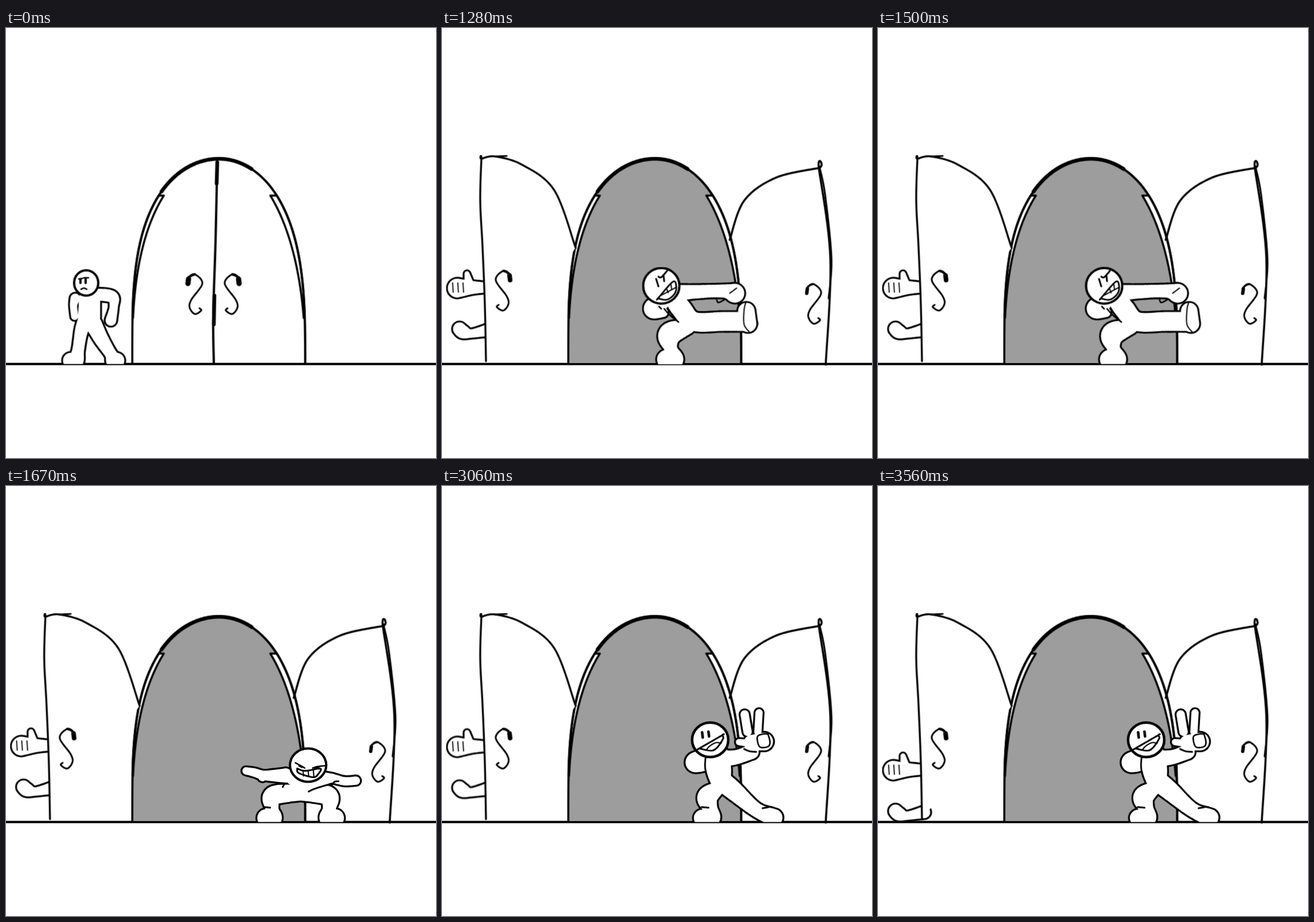
Animation of 748 by 748 pixels, one loop 3.62 s. Source, as an HTML page:

```html
<!DOCTYPE html>
<html lang="en">
<head>
<meta charset="utf-8">
<title>Door kick</title>
<style>
html, body { margin: 0; width: 100%; height: 100%; overflow: hidden; background: #fff; }
svg { display: block; width: 100vw; height: 100vh; }
path { stroke-linecap: round; stroke-linejoin: round; }
.pose { transform-origin: 511px 584px; }
</style>
</head>
<body>
<svg id="stage" viewBox="0 0 748 748">
  <clipPath id="above"><rect x="-200" y="-200" width="1200" height="784"/></clipPath>
</svg>
<script>
const LOOP = 3620, INK = '#000', RED = '#fb0446', GREY = '#9d9d9d', GROUND = 584;
const stage = document.getElementById('stage');

function node(tag, attrs, parent) {
  const el = document.createElementNS('http://www.w3.org/2000/svg', tag);
  for (const k in attrs) el.setAttribute(k, attrs[k]);
  return parent.appendChild(el);
}
const root = node('g', { transform: 'translate(.5 .5)' }, stage);
const group = (attrs = {}, parent = root) => node('g', attrs, parent);
const lerp = (a, b, u) => a.map((v, k) => v + (b[k] - v) * u);
const parse = text => text.split(' ').map(s => s.split(',').map(Number));

let seed = 7;
const rand = () => (seed = seed * 16807 % 2147483647) / 2147483647;
const jitter = size => (rand() - 0.5) * 2 * size;

// Samples a Catmull-Rom curve in any dimension; a doubled point makes a corner.
function spline(p, n = 12) {
  const at = i => p[Math.max(0, Math.min(p.length - 1, i))];
  const out = [p[0]];
  for (let i = 0; i < p.length - 1; i++)
    for (let s = 1; s <= n; s++) {
      const u = s / n, [a, b, c, d] = [-1, 0, 1, 2].map(k => at(i + k));
      out.push(b.map((v, k) => v + u / 2 * (c[k] - a[k] +
        u * (2 * a[k] - 5 * v + 4 * c[k] - d[k] + u * (3 * (v - c[k]) + d[k] - a[k])))));
    }
  return out;
}
function trace(parent, width, pts, fill = 'none', stroke = INK) {
  return node('path', { d: 'M' + pts.join('L'), fill, stroke, 'stroke-width': width }, parent);
}
const draw = (parent, width, text, fill, stroke) => trace(parent, width, spline(parse(text)), fill, stroke);
const lines = (parent, width, list, stroke) => list.forEach(s => draw(parent, width, s, 'none', stroke));
const oval = (parent, cx, cy, rx, ry, width) =>
  node('ellipse', { cx, cy, rx, ry, fill: '#fff', stroke: INK, 'stroke-width': width }, parent);

// Merges limbs, each a chain of x,y,radius, into one outlined body.
function body(parent, limbs) {
  const g = group({}, parent);
  for (const [grow, fill] of [[1.6, INK], [-1.6, '#fff']])
    for (const limb of limbs) {
      const d = spline(parse(limb)).map(([x, y, size]) => {
        const r = size + grow;
        return `M${x - r},${y}a${r},${r} 0 1 0 ${2 * r},0a${r},${r} 0 1 0 ${-2 * r},0`;
      });
      node('path', { d: d.join(''), fill }, g);
    }
}

const [ground, arch, closed, open, burst, kick, crouch, wave] =
  ['', '', '', '', '', 'pose', 'pose', 'pose'].map(name => group({ class: name }));
const grounded = parent => group({ 'clip-path': 'url(#above)' }, parent);

draw(ground, 4, `-5,${GROUND} 753,${GROUND}`);

// Doorway: each half is a superellipse; a lower power gives the inner rim.
function rim(half, power, from = 0, to = 1) {
  return Array.from({ length: 61 }, (_, i) => {
    const v = from + (to - from) * Math.sin(i / 60 * Math.PI / 2);
    return [370 + half * Math.sqrt(Math.max(0, 1 - v ** power)), 582 - 355 * v];
  });
}
const leftRim = rim(-151, 3.3), rightRim = rim(150, 3).reverse();
const dark = trace(arch, 0, [...leftRim, ...rightRim], GREY, 'none');
for (const [half, outer, inner] of [[-151, 3.3, 2.6], [150, 3, 2.2]])
  trace(arch, 3.5, [...rim(half, outer, 0.22, 0.82), ...rim(half, inner, 0.22, 0.82).reverse()], '#fff');
trace(arch, 4, [...leftRim, ...rightRim]);
trace(arch, 6.5, [...rim(-151, 3.3, 0.84), ...rim(150, 3, 0.95).reverse()]);

// Curled door handle
function handle(parent, x, y, flip, head) {
  const g = group({ transform: `translate(${x} ${y}) scale(${flip} 1)` }, parent);
  draw(g, 3, '12,-17 11,-28 0,-34 -13,-18 6,10 9,24 0,35 -11,29 -8,25');
  draw(g, head, '12,-18 11,-26');
  draw(g, head / 2, '11,-28 6,-32 0,-34');
}

// Closed doors and waiting figure
draw(closed, 4, '367,231 364,370 360,500 361,582');
lines(closed, 6.5, ['367,233 366,270', '362,465 361,515']);
handle(closed, 328, 462, -1, 9);
handle(closed, 393, 462, 1, 9);

function idle(parent) {
  body(grounded(parent), [
    '120,470,10 117,482,8 119,501,8',
    '156,463,12 184,467,12 187,484,9 182,508,11',
    '145,470,20 144,502,21',
    '140,508,17 131,525,13 125,560,12 121,578,15 112,578,15',
    '152,515,16 165,540,14 182,567,12 188,578,16 192,578,15']);
  oval(parent, 139, 443, 21, 22, 4);
  lines(parent, 2.5, ['126,436 133,435', '135,434 143,434', '130,454 135,452 140,454']);
  lines(parent, 4, ['129,437 129,443', '138,435 138,443']);
}
idle(closed);

// Open doors, with a flattened figure behind the left one
const limbs = group({}, grounded(open));
body(limbs, ['80,451,10 52,451,13 26,452,18', '46,442,9 43,427,6']);
body(limbs, ['80,525,12 50,531,9 36,528,13 30,523,13']);
for (let x = 18; x < 40; x += 9) draw(limbs, 1.8, `${x},443 ${x + 1},459`);
draw(open, 3.3, '76,579 74,480 70,380 66,300 68,227 68,227 92,223 140,238 195,282 232,382', '#fff');
draw(open, 3.5, '500,368 525,300 580,260 655,243 655,243 675,400 667,585');
lines(open, 3, ['656,240 666,290 677,400 672,470', '92,223 112,222']);
handle(open, 106, 456, 1, 8);
handle(open, 646, 479, -1, 6);

// Doors mid-swing
idle(burst);
draw(burst, 3, '138,582 127,440 150,227 150,227 230,237 335,233 335,233 303,350 279,583', '#fff');
draw(burst, 3.5, '279,583 284,490 303,350 345,234 345,234 393,234 393,234 432,390 440,578', GREY);
lines(burst, 3, [
  '153,226 136,350 133,500', '408,235 480,238 578,228 578,228 608,320 628,470 618,580',
  '414,275 434,400 445,548']);
lines(burst, 5, ['138,582 180,584 280,583', '440,578 500,582 618,580', '335,234 383,226 412,237']);
lines(burst, 1.7, ['586,232 600,270 607,315', '578,260 598,400 597,468']);

// Scratchy shading: leaning columns crossed by looping rows.
function hatch(x, y, width, height, lean, cols, rows) {
  for (let i = 0; i < cols; i++) {
    const cx = x + width * (i + 0.4) / cols;
    trace(burst, 1.7, spline([[cx, y + 15 + jitter(15)], [cx + lean, y + height / 2], [cx + lean, y + height - 20 + jitter(20)]]));
  }
  for (let i = 0; i < rows; i++) {
    const cy = y + height * i / (rows - 1), end = x + width + jitter(20);
    const row = [[x + jitter(15), cy], [x + width / 2, cy + jitter(6)], [end, cy + jitter(8)],
      [x + width * 0.4, cy + 8 + jitter(5)], [end - 15, cy + 14 + jitter(8)]];
    trace(burst, 2.3, spline(row.slice(0, 3 + i % 3)));
  }
}
hatch(168, 268, 115, 262, -20, 5, 11);
hatch(490, 266, 95, 282, 14, 4, 9);
draw(burst, 2.4, '465,266 493,420 483,530');

// Red impact scribbles; a zigzag sweeps one spike towards another.
function zigzag(first, last, count) {
  const [a, b] = [first, last].map(parse), pts = [];
  for (let k = 0; k < count; k++)
    for (const end of [0, 1]) {
      const p = lerp(a[end], b[end], k / (count - 1));
      pts.push(p, p.map(v => v + 1));
    }
  trace(burst, 2.8, spline(pts), 'none', RED);
}
zigzag('58,16 22,222', '174,84 105,303', 3);
zigzag('222,180 152,340', '296,325 242,420', 5);
zigzag('413,280 473,327', '352,306 407,349', 3);
zigzag('400,438 393,492', '455,440 445,505', 3);
lines(burst, 2.6, [
  '0,105 30,65 58,16', '105,303 130,295 170,260 222,180',
  '338,0 318,28 270,52 275,70 352,132 341,136',
  '716,0 748,66 630,88 601,150 585,175 468,208 521,285 515,300 413,280',
  '748,402 720,395 595,332 600,382 600,382 515,352 487,362 500,390',
  '445,505 480,460 505,460 534,570 534,570 580,505 660,505 748,590',
  '0,631 120,675 110,625 57,560 95,575 88,552 170,500 215,490',
  '145,500 200,480 335,508 240,430 360,468 280,433',
  '338,505 348,542 305,555 358,615 275,620 290,685 340,748',
  '358,615 390,675 218,654 300,715 200,712 140,728 188,700',
  '300,715 170,723 182,748'], RED);
lines(burst, 1.7, [
  '72,334 130,333 180,310 215,230', '128,0 180,42 266,104 255,71',
  '460,48 470,140 446,201', '516,26 500,65 484,152',
  '625,266 705,265 686,232', '637,243 683,294', '678,498 550,437 535,457',
  '583,597 650,612 748,653', '466,686 465,662 470,660',
  '4,390 132,408 10,392', '10,399 100,418 195,430',
  '0,597 70,610 205,640 202,610', '215,490 115,470 195,520 148,495'], RED);

// Kicking figure
body(grounded(kick), [
  '392,478,15 379,488,18 396,494,10',
  '410,462,18 440,459,14 500,457,13 521,461,18',
  '415,470,18 428,488,19 450,510,18 500,510,18 538,510,18',
  '541,492,16 544,514,16',
  '440,520,13 408,532,21 409,556,13 415,576,18 402,576,18']);
lines(kick, 2.6, ['398,488 408,499 423,511', '389,484 393,488', '489,469 492,477 503,472']);
lines(kick, 2, ['540,477 537,490 537,515 546,528', '512,461 524,452']);
oval(kick, 393, 448, 31.5, 31, 4);
draw(kick, 2.8, '387,470 387,470 413,441 419,449 416,462 403,472 387,470', '#fff');
lines(kick, 2, ['392,465 405,458 418,451', '402,452 405,460', '410,446 411,455']);
lines(kick, 3, ['384,436 388,449', '388,432 393,433 403,422', '397,431 398,440']);

// Crouching figure, legs mirrored
const leg = parse('512,533,15 465,538,18 462,560,13 464,577,17 452,577,17');
body(grounded(crouch), [
  leg.join(' '), leg.map(([x, y, r]) => [1024 - x, y, r]).join(' '),
  '486,503,14 450,503,10 432,498,9 417,495,8', '444,507,7 446,509,6',
  '540,510,16 565,508,10 588,513,9 608,512,9',
  '500,506,16 525,512,20 535,510,18']);
lines(crouch, 3, ['526,531 537,526 566,517', '484,517 481,523', '459,559 450,558', '566,520 571,514 578,513']);
oval(crouch, 525, 485, 31.5, 29, 4);
lines(crouch, 2.6, ['503,481 519,490', '533,490 545,487 557,486']);
lines(crouch, 4, ['510,486 514,488', '538,489 543,488']);
draw(crouch, 3, '506,491 520,495 546,491 543,500 534,506 509,499 506,491', '#fff');
for (let x = 516; x < 540; x += 9) draw(crouch, 2, `${x},494 ${x + 1},504`);

// Waving figure
body(grounded(wave), [
  '446,475,16 440,481,18 460,484,12',
  '480,470,21 481,492,23 484,512,19',
  '485,512,19 505,528,18 545,562,14 574,575,16 577,576,16',
  '476,528,14 461,541,19 466,560,14 469,577,16 452,577,16',
  '485,474,16 512,471,14 538,462,14',
  '538,446,15 560,444,17',
  '535,447,8 516,445,7', '526,397,9 531,427,9', '551,394,8 549,427,8']);
lines(wave, 3, ['458,470 457,485 458,496', '451,558 463,559', '557,560 568,558', '525,457 535,461 546,462']);
draw(wave, 2.6, '566,429 570,445 566,453 552,453 548,436 558,431 566,431');
oval(wave, 466, 441, 31.5, 30, 4.5);
lines(wave, 4.5, ['452,428 453,437', '463,427 464,435']);
draw(wave, 3, '447,456 447,456 487,433 487,433 488,440 472,459 447,456', '#fff');
draw(wave, 2.2, '459,459 465,452 476,446 485,447');

// Held steps: [time, opacity, transform]
function steps(el, table) {
  const frames = table.map(([t, opacity, transform = 'none']) =>
    ({ offset: t / LOOP, opacity, transform, easing: 'step-end' }));
  frames.push({ ...frames[frames.length - 1], offset: 1 });
  el.animate(frames, { duration: LOOP, iterations: Infinity });
}
// An 18 fps tick on a 10 ms grid, turned into a moving pose.
const ticks = (start, count, move) => Array.from({ length: count }, (_, k) =>
  [start + Math.floor(k * 50 / 9) * 10, 1, move(k)]);

steps(arch, [[0, 1], [1220, 0], [1280, 1]]);
steps(dark, [[0, 0], [1280, 1]]);
steps(closed, [[0, 1], [1220, 0]]);
steps(burst, [[0, 0], [1220, 1], [1280, 0]]);
steps(open, [[0, 0], [1280, 1]]);
steps(kick, [[0, 0], ...ticks(1280, 5, k => `translateX(${-12 * 0.3 ** k}px)`), [1560, 0]]);
steps(crouch, [[0, 0], [1560, 1, 'scale(1.2,.85)'], [1610, 1, 'scale(.96,1.06)'], [1670, 1],
  [2060, 1, 'scale(1.31,.75)'], [2110, 0]]);
steps(wave, [[0, 0], [2110, 1, 'scale(.95,1.13)'], [2170, 1]]);
steps(limbs, [[0, 1], ...ticks(3060, 10, k => `translateY(${42 * ((k + 1) / 10) ** 1.5}px)`)]);
</script>
</body>
</html>
```
